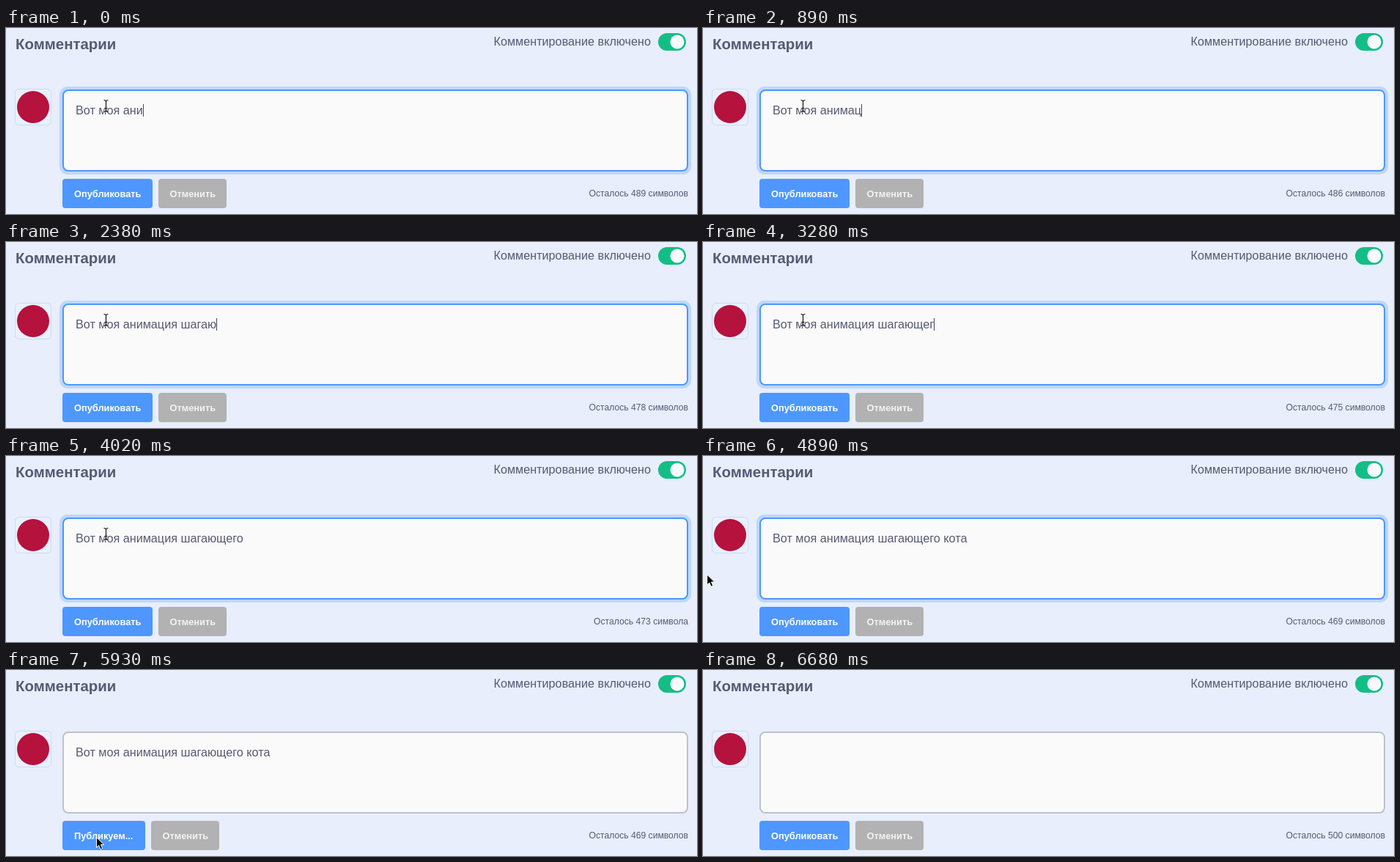
Animation, 943 px wide and 254 px high, one loop 7250 ms. Source, as an HTML page:

```html
<!DOCTYPE html>
<html lang="ru">
<head>
<meta charset="utf-8">
<title>Комментарии</title>
<style>
  html, body { margin: 0; width: 100%; height: 100%; overflow: hidden; background: #e8eefb; }
  svg { display: block; width: 943px; height: 254px; font: 16.2px "Liberation Sans", Arial, sans-serif; }
  text { fill: #565a73; white-space: pre; }
  .title { font-size: 20.4px; font-weight: bold; }
  .count { font-size: 12.15px; }
  .button text { font-size: 12.8px; font-weight: bold; fill: #fff; }
  .end { text-anchor: end; }
  .cursor { stroke-linejoin: round; display: none; }
</style>
</head>
<body>
<svg viewBox="0 0 943 254">
  <rect width="943" height="254" fill="#e8eefb"/>
  <text class="title" x="13" y="29">Комментарии</text>
  <text class="end" x="880" y="24">Комментирование включено</text>
  <rect x="890" y="7" width="38" height="24" rx="12" fill="#13be86"/>
  <circle cx="916" cy="19" r="9.5" fill="#f8f9fb"/>

  <rect x="12.5" y="83.5" width="49" height="49" rx="5" fill="#e9f0fc" stroke="#c8dcf9"/>
  <circle cx="37" cy="108" r="22" fill="#b5123e"/>

  <rect id="ring" x="73" y="80" width="862" height="120" rx="11" fill="#bfd7fb"/>
  <rect id="field" x="78" y="85" width="852" height="110" rx="7" fill="#fafafa" stroke-width="2"/>
  <text id="comment" x="95" y="118"></text>
  <rect id="caret" y="104" width="1" height="17" fill="#44485e"/>

  <g class="button">
    <rect id="publishBox" x="77" y="206" height="40" rx="4" fill="#4d97ff"/>
    <text id="publish" x="93" y="231"></text>
  </g>
  <g id="cancel" class="button">
    <rect x="208" y="206" width="93" height="40" rx="4" fill="#b2b2b2"/>
    <text x="223.5" y="231" style="fill:#f3f3f3">Отменить</text>
  </g>
  <text id="count" class="count end" x="931" y="230"></text>

  <g id="beam" class="cursor" fill="none">
    <path d="M-3-8q3 0 3 2 0-2 3-2M0-6V6M-3 8q3 0 3-2 0 2 3 2M-2 3h4" stroke="#fff" stroke-width="2.6" opacity=".75"/>
    <path d="M-3-8q3 0 3 2 0-2 3-2M0-6V6M-3 8q3 0 3-2 0 2 3 2M-2 3h4" stroke="#111" stroke-width="1.2"/>
  </g>
  <path id="arrow" class="cursor" d="M0 0v14l3.2-3 2.3 5.3 2.6-1.1-2.2-5.1h4.4z" fill="#000" stroke="#fff"/>
  <path id="hand" class="cursor" d="M-1.5 10V0.5q1.5-2 3 0V6q2-1.4 3 .5 2-1 2.8.7 2-.5 2.2 1.3v4q-.3 2-1.5 3v1.5h-7q-1-2-3-4.500l-3-4q.8-2 3.500 1.500z" fill="#fff" stroke="#000"/>
</svg>
<script>
  const LOOP = 7250, LIMIT = 500;
  const BLUR = 5930, CLEAR = 6680;
  const MESSAGE = "Вот моя анимация шагающего кота";

  // time, characters typed
  const typing = [
    [0, 11], [150, 12], [300, 13], [750, 14], [900, 15], [1040, 16], [1190, 17],
    [1640, 18], [1790, 19], [1930, 20], [2080, 21], [2380, 22], [2830, 23], [2980, 24],
    [3280, 25], [3430, 26], [3570, 27], [4160, 28], [4310, 30], [4460, 31], [CLEAR, 0]
  ];
  // time, caret visible
  const blinking = [[0, true], [4020, false], [4160, true], [4890, false], [5340, true], [BLUR, false]];
  // time, cursor, x, y
  const pointing = [
    [0, "beam", 136.5, 106.5], [4600, "beam", 108, 124], [4750, "arrow", 42, 150],
    [4890, "arrow", 5.5, 162], [5040, "beam", 93, 186], [5190, "hand", 105, 213],
    [5340, "hand", 115, 224], [5490, "hand", 121, 228], [5630, "hand", 124, 229],
    [BLUR, "arrow", 123.5, 228.5], [6230, "arrow", 646.5, 218.5], [6380, "none", 0, 0]
  ];

  const $ = id => document.getElementById(id);
  const at = (steps, time) => steps.findLast(step => step[0] <= time);
  const show = (node, on) => { node.style.display = on ? "inline" : "none"; };

  function symbols(n) {
    const unit = n % 10, teen = n % 100 > 10 && n % 100 < 20;
    if (!teen && unit === 1) return "символ";
    return !teen && unit > 1 && unit < 5 ? "символа" : "символов";
  }

  function draw(time) {
    const [, length] = at(typing, time);
    const [, caretOn] = at(blinking, time);
    const [, cursor, x, y] = at(pointing, time);
    const focused = time < BLUR;
    const sending = time >= BLUR && time < CLEAR;
    const left = LIMIT - length;

    $("comment").textContent = MESSAGE.slice(0, length);
    $("count").textContent = `Осталось ${left} ${symbols(left)}`;
    show($("caret"), caretOn);
    if (caretOn) $("caret").setAttribute("x", Math.round(95 + $("comment").getComputedTextLength()));

    show($("ring"), focused);
    $("field").setAttribute("stroke", focused ? "#4d97ff" : "#bfc2c9");
    $("publish").textContent = sending ? "Публикуем..." : "Опубликовать";
    $("publishBox").setAttribute("width", sending ? 113 : 123);
    $("cancel").setAttribute("transform", `translate(${sending ? -10 : 0} 0)`);

    for (const id of ["beam", "arrow", "hand"]) show($(id), id === cursor);
    if (cursor !== "none") $(cursor).setAttribute("transform", `translate(${x} ${y})`);
  }

  const start = performance.now();
  function tick() {
    draw((performance.now() - start) % LOOP);
    requestAnimationFrame(tick);
  }
  tick();
</script>
</body>
</html>
```
